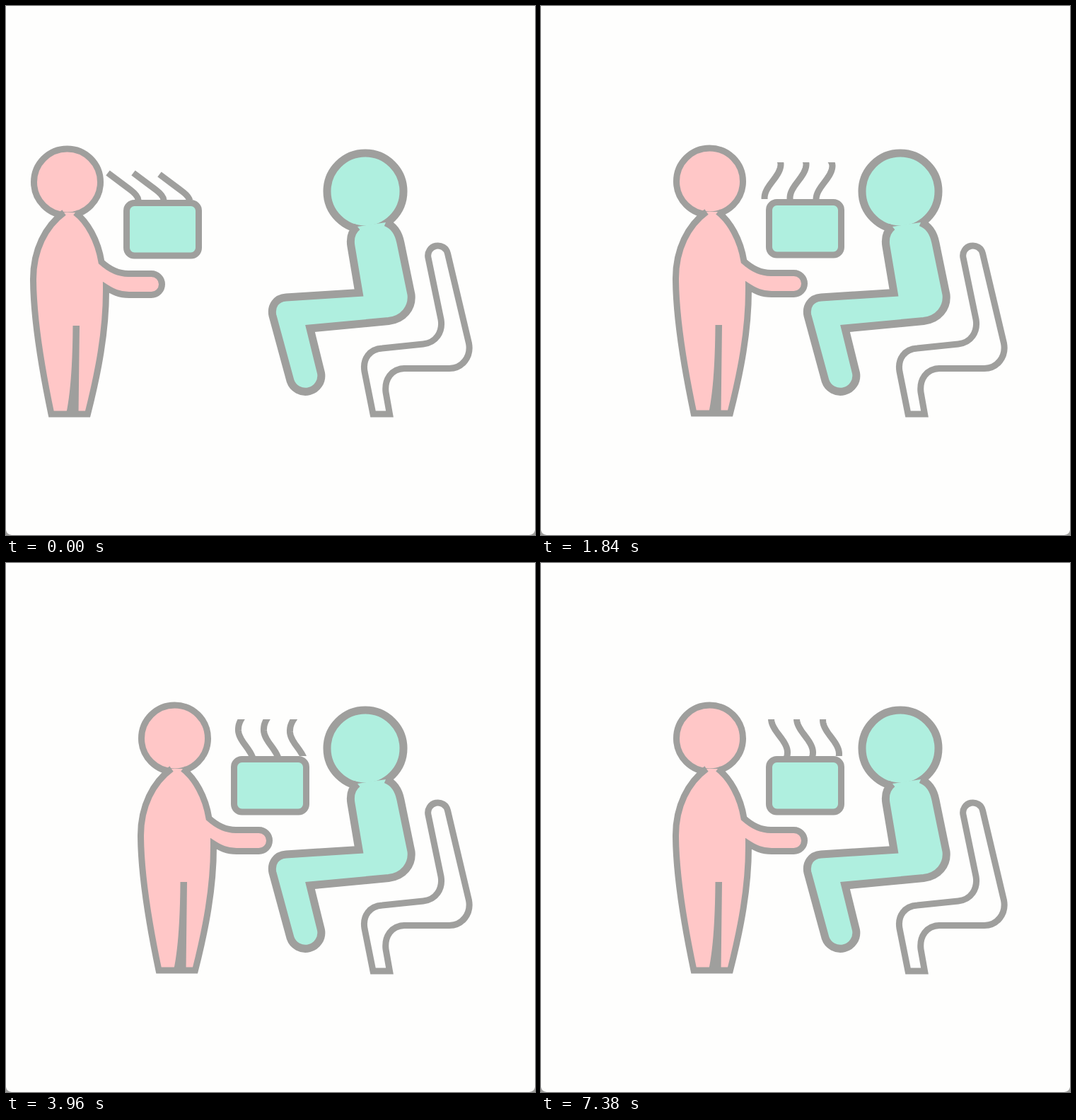
Animation of 748x748 px, one loop 7.42 s. Source, as an HTML page:

```html
<!DOCTYPE html>
<html lang="en">
<head>
<meta charset="utf-8">
<title>Warm delivery</title>
<style>
  html, body { margin: 0; width: 100%; height: 100%; overflow: hidden; background: #fefefd; }
  svg { display: block; width: 100vw; height: 100vh; }
  .line { stroke: #9f9f9d; stroke-width: 9; }
  .thick { stroke-width: 11; }
  .pink { fill: #ffc7c7; }
  .mint { fill: #afefdf; }
  .gray { fill: #9f9f9d; }
  .none { fill: none; }
</style>
</head>
<body>
<svg viewBox="0 0 748 748">
  <defs>
    <clipPath id="steamWindow"><rect x="100" y="222" width="260" height="52"/></clipPath>
  </defs>

  <path class="gray" d="M0 741Q1 747 8 748H0ZM748 741Q747 747 740 748H748Z"/>

  <!-- chair -->
  <path class="line none" d="M519 577L507 517C504 499 514 485 532 484L590 478
    C608 476 618 461 615 443L597 356A14 14 0 0 1 624.5 350L654.5 477
    C658 496 645 512.5 627 512.5H563C545 513 535 528 537 546L542.5 577Z"/>

  <!-- seated figure -->
  <g class="line thick mint">
    <circle cx="508" cy="262" r="54"/>
    <path d="M497 312C488 319 486 328 488 340L499 405.500L396 412
      C382 413 374 424 377 438L402 530A22.500 22.500 0 0 0 445.500 519L430 456L541 445.500
      C562 443 575 427 573 408L558 335C555 320 549 311 537 306"/>
  </g>

  <!-- standing figure with the warm box -->
  <g id="carrier">
    <g class="line pink">
      <circle cx="86.500" cy="249" r="47"/>
      <path d="M82 292C56 311 38 345 38.500 388C39 445 51 515 64 577H115.500
        C130 520 142 460 141.500 398C151 404 160 408.500 174 408.500H205.500
        A15 15 0 0 0 205.500 378.500H173C158 378.500 146 372 135 362
        C130 331 115 305 98 292"/>
    </g>
    <path class="gray" d="M94.500 452H104L102.500 577H85Q94 535 94.500 452Z"/>
    <g clip-path="url(#steamWindow)">
      <g id="steam" class="line none"></g>
    </g>
    <rect class="line mint" x="170.500" y="278.500" width="102" height="74.500" rx="11"/>
  </g>
</svg>
<script>
const LOOP = 7420;
const TRAVEL = 152;
const HALF_WAVE = 48;
const STEAM_LENGTH = 640;

const carrier = document.getElementById('carrier');
const steam = document.getElementById('steam');
const clamp01 = x => Math.min(1, Math.max(0, x));

// Full-influence ease: slow ends and a near jump in the middle.
function snapEase(t, middle, duration) {
  const p = clamp01(0.5 + (t - middle) / duration);
  const s = 0.5 + Math.cbrt((p - 0.5) / 4);
  return s * s * (3 - 2 * s);
}

function waveX(v) {
  const drift = 12.5 * clamp01((v - 50) / 380) - 3 * clamp01((v - 430) / 100);
  return 9.5 + drift + 11.5 * Math.cos(Math.PI * v / HALF_WAVE);
}

function steamPath() {
  let d = 'M-22 -39L10 -15C18 -9 21 -5 21 0';
  for (let v = 2; v <= STEAM_LENGTH; v += 2) d += `L${waveX(v).toFixed(2)} ${v}`;
  return d;
}

const strandPath = steamPath();
for (const [x, y] of [[0, 0], [36, 0], [73, 2]]) {
  const strand = document.createElementNS('http://www.w3.org/2000/svg', 'path');
  strand.setAttribute('d', strandPath);
  strand.setAttribute('transform', `translate(${x} ${y})`);
  steam.append(strand);
}

function render(t) {
  const walk = snapEase(t, 755, t < 755 ? 570 : 1365);
  const rise = 40 * walk * walk + 542 * snapEase(t, 3724, 6460);
  carrier.setAttribute('transform', `translate(${TRAVEL * walk} ${-walk})`);
  steam.setAttribute('transform', `translate(166 ${275 - rise})`);
}

let start;
function tick(now) {
  start ??= now;
  render((now - start) % LOOP);
  requestAnimationFrame(tick);
}
render(0);
requestAnimationFrame(tick);
</script>
</body>
</html>
```
